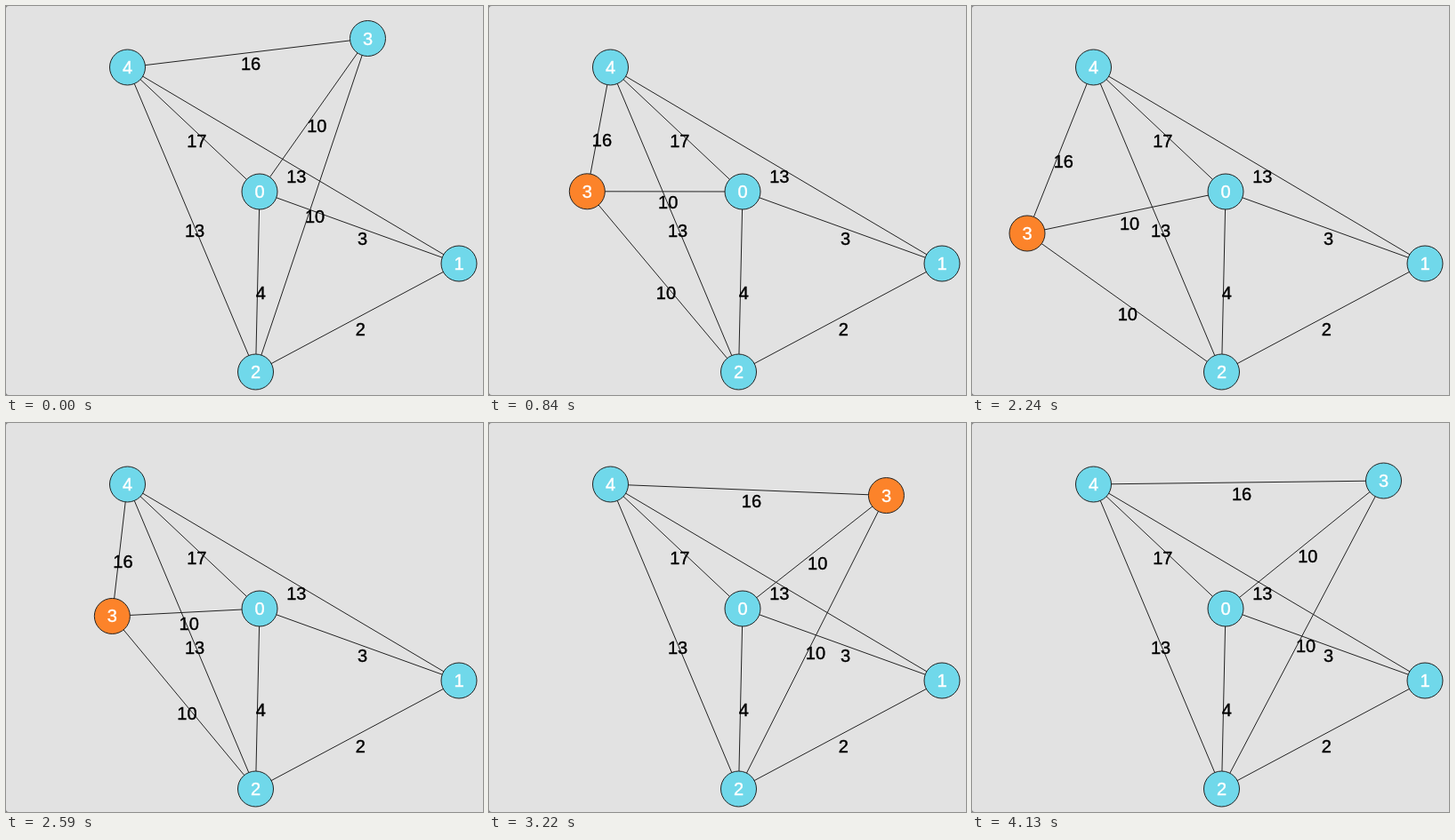
Recreate the animation shown at these times as an HTML page with a canvas. Size 536 by 438 pixels, loop 4830 ms.

```html
<!DOCTYPE html>
<html lang="en">
<head>
<meta charset="utf-8">
<title>Weighted graph</title>
<style>
  html, body { margin: 0; width: 100%; height: 100%; overflow: hidden; background: #e2e2e2; }
  canvas { display: block; }
</style>
</head>
<body>
<canvas id="stage" width="536" height="438"></canvas>
<script>
const ctx = document.getElementById('stage').getContext('2d');
const LOOP = 4830, STEP = 70, FADE = 280, RADIUS = 20, DRAGGED = 3;
const BLUE = [112, 216, 234], ORANGE = [252, 131, 42];

const nodes = [[285, 209], [509, 290], [280.5, 412], [406.5, 36.5], [136.5, 69]];
const [START, LEFT, RIGHT] = [[406.5, 36.5], [62, 256], [462.5, 65]];

// One weight per node pair in order, 0 for no edge
const weights = [3, 4, 10, 17, 2, 0, 13, 10, 13, 16];
const edges = nodes
  .flatMap((_, a) => nodes.slice(a + 1).map((_, i) => [a, a + 1 + i]))
  .map(([a, b], i) => [a, b, weights[i]])
  .filter(edge => edge[2]);

const clamp = v => Math.max(0, Math.min(1, v));
const mix = (a, b, u) => a + (b - a) * u;

// S-curve from 0 to 1 that is half way at mid
function ease(u, mid, power) {
  if (u <= 0) return 0;
  return 1 / (1 + ((1 - u) / u * mid / (1 - mid)) ** power);
}

function drag(t, from, to, begin, end, easeX, easeY) {
  const u = clamp((t - begin) / (end - begin));
  return [mix(from[0], to[0], ease(u, ...easeX)), mix(from[1], to[1], ease(u, ...easeY))];
}

function dragPosition(t) {
  return t < 2310
    ? drag(t, START, LEFT, 140, 1330, [0.406, 2.46], [0.468, 2.67])
    : drag(t, LEFT, RIGHT, 2310, 3640, [0.362, 2.37], [0.366, 1.78]);
}

function dragColor(t) {
  const heat = clamp(t / FADE) - clamp((t - 3850) / FADE);
  return BLUE.map((c, i) => Math.round(mix(c, ORANGE[i], heat)));
}

// A thin outline gives the digits a little more weight
function label(text, x, y, color) {
  ctx.fillStyle = ctx.strokeStyle = color;
  ctx.lineWidth = 0.4;
  ctx.fillText(text, x, y);
  ctx.strokeText(text, x, y);
}

function stroke() {
  ctx.strokeStyle = '#222';
  ctx.lineWidth = 1;
  ctx.stroke();
}

function draw(t) {
  nodes[DRAGGED] = dragPosition(t);
  ctx.fillStyle = '#777';
  ctx.fillRect(0, 0, 536, 438);
  ctx.fillStyle = '#e2e2e2';
  ctx.beginPath();
  ctx.roundRect(0, 0, 536, 438, [3, 0, 0, 3]);
  ctx.fill();

  ctx.font = '20px "Liberation Sans", Arial, sans-serif';
  ctx.textAlign = 'center';

  ctx.beginPath();
  for (const [a, b] of edges) {
    ctx.moveTo(...nodes[a]);
    ctx.lineTo(...nodes[b]);
  }
  stroke();

  for (const [a, b, weight] of edges) {
    const [x, y] = [0, 1].map(k => mix(nodes[a][k], nodes[b][k], 0.5));
    label(weight, x + 3.5, y + 19.5, '#000');
  }

  nodes.forEach(([x, y], i) => {
    ctx.fillStyle = `rgb(${i === DRAGGED ? dragColor(t) : BLUE})`;
    ctx.beginPath();
    ctx.arc(x, y, RADIUS, 0, 2 * Math.PI);
    ctx.fill();
    stroke();
    label(i, x, y + 7, '#fff');
  });
}

let start;
function tick() {
  const now = performance.now();
  start ??= now;
  draw(Math.floor((now - start) % LOOP / STEP) * STEP);
  requestAnimationFrame(tick);
}
tick();
</script>
</body>
</html>
```
